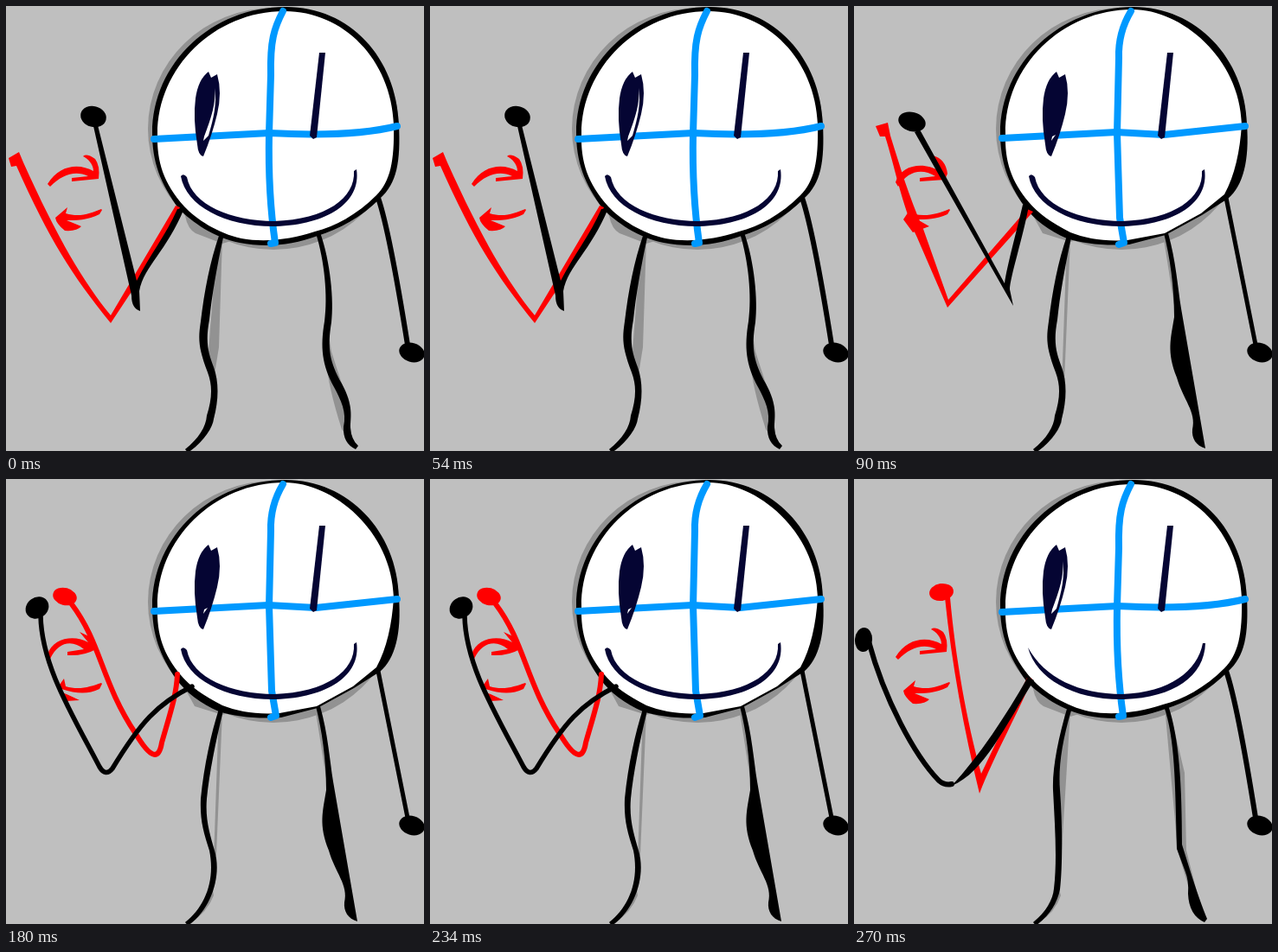
Recreate the animation shown at these times as an HTML page with a canvas. Size 483 px wide and 515 px high, loop 0.36 s.

```html
<!DOCTYPE html>
<html lang="en">
<head>
<meta charset="utf-8">
<title>Waving doodle</title>
<style>
html, body { margin: 0; width: 100%; height: 100%; overflow: hidden; background: #bfbfbf; }
canvas { display: block; }
</style>
</head>
<body>
<canvas id="stage" width="483" height="515"></canvas>
<script>
const ctx = document.getElementById('stage').getContext('2d');
const BLACK = '#000', RED = '#f00', BLUE = '#0099ff', NAVY = '#050533', GRAY = '#929292';
const STEP = 90;

function fill(color, d) {
  ctx.fillStyle = color;
  ctx.fill(new Path2D(d));
}

function line(color, width, d) {
  ctx.strokeStyle = color;
  ctx.lineWidth = width;
  ctx.stroke(new Path2D(d));
}

function oval(color, x, y, rx, ry, degrees = 0) {
  ctx.fillStyle = color;
  ctx.beginPath();
  ctx.ellipse(x, y, rx, ry, degrees * Math.PI / 180, 0, 2 * Math.PI);
  ctx.fill();
}

// Two ways the body line work is drawn: smooth curves and a simplified, angular version.
const smooth = {
  chin: 'M200 230L207 243Q210 258 219 263L250 275L300 260Z',
  rim: 'M323 1C398 1 451 60 454 137C456 180 452 205 432 223C410 245 385 258 360 266C330 277 300 280 270 274C240 268 215 250 200 235C178 205 169 180 169 147C169 66 238 1 323 1Z',
  skin: 'M322 6C390 6 445 62 448 137C449 180 444 203 428 219C405 242 380 255 357 261C330 270 300 274 272 269C245 263 220 247 206 232C182 205 174 180 175 148C175 72 240 6 322 6Z',
  across: 'M171 154L304 147Q400 152 452 139',
  down: 'M320 6C310 25 305 40 306 80L304 147C303 200 306 240 311 274L306 275',
  gap: 'M241 95C243 112 237 130 229 151L228 156L234 150C240 130 244 112 241 95Z',
  arm: 'M430 222Q443 260 464 392', armWidth: 6,
  arrows: 'M48 206C62 183 85 182 101 191C101 183 95 177 89 174Q93 170 103 177Q109 185 107 200L76 203L76 199L95 197C80 190 65 195 51 209Z' +
    'M111 236L108 241C95 248 80 248 70 248L87 255Q82 261 68 260Q58 252 57 245L71 233L69 240C85 245 98 240 110 235Z'
};

const angular = {
  chin: 'M200 230L218 263L250 273L300 260Z',
  rim: 'M323 1C395 1 452 60 454 137C457 178 450 208 432 223L402 242L360 265L318 276C290 278 265 275 246 269C225 260 208 247 197 232C178 205 169 180 169 147C169 66 238 1 323 1Z',
  skin: 'M322 4C378 4 446 60 448 137C446 168 440 196 428 218L401 240L359 263L316 271C290 273 268 269 250 262C228 251 212 239 202 227C182 203 174 180 175 148C174 70 240 4 322 4Z',
  across: 'M171 153L303 146L358 149L452 139',
  down: 'M320 6Q305 31 306 60L304 147L307 245L312 274L306 276',
  gap: 'M229 151L228 156L233 149Z',
  arm: 'M430 222L464 392', armWidth: 5,
  arrows: 'M48 204C54 183 82 180 98 191Q97 181 91 173Q106 177 108 194L105 201L76 203L76 199L94 197C78 187 62 191 51 209Z' +
    'M111 236L108 241C95 247 83 247 73 247L87 255L68 262L57 247L67 232L70 241C85 244 98 240 110 235Z'
};

const MOUTH = 'M202 197Q205 193 209 198C215 230 260 249 310 249C370 247 404 222 402 191L405 189C411 228 370 253 312 255C255 256 208 232 202 197Z';
const POINTED_MOUTH = 'M201 195C220 230 260 249 310 249C365 247 397 222 403 190L406 190C405 228 370 253 312 255C255 256 211 232 201 195Z';
const CURVY_LEG = 'M246 266L251 268C243 305 238 335 235 363C230 390 234 402 240 418C246 435 246 455 240 478C239 488 228 505 210 517L207 513C223 500 231 487 232 474C238 455 239 440 233 424C222 395 222 385 225 365C229 330 236 295 246 266Z';
const WEDGE_LEG = 'M358 263L363 263C372 295 374 325 378 350L406 512C395 509 390 500 391 490C396 470 380 455 373 430C361 400 366 385 370 360C370 325 365 290 358 263Z';
const THIN_SHADE = 'M246 268L250 269L243 435L240 440ZM357 264L362 266L375 350L370 346ZM238 470L240 482Q232 502 214 513Z';

const poses = [
  {
    body: smooth, mouth: MOUTH, leftLeg: CURVY_LEG,
    shade: 'M244 268L250 268L246 395L240 432L234 400ZM372 375L376 400L398 468L397 500L388 490Q372 440 370 410Z',
    rightLeg: 'M358 263L363 262C375 297 379 340 376 366C371 396 374 412 388 437C402 463 398 475 398 488Q399 502 407 509L404 513Q389 506 390 487C394 470 387 456 379 441C365 415 363 395 368 365C372 335 368 295 358 263Z',
    waving() {
      fill(RED, 'M3 176L15 169L20 181C60 270 90 320 121 358L196 231L201 233C185 270 160 305 152 320L121 367C75 310 50 270 12 185L6 186Z');
      fill(BLACK, 'M101 139L106 138L151 318C165 290 185 265 198 235L206 234C185 285 160 300 154 330L155 353Q145 350 145 335Z');
      oval(BLACK, 101, 128, 15, 12, 15);
    }
  },
  {
    body: angular, mouth: MOUTH, leftLeg: CURVY_LEG, rightLeg: WEDGE_LEG, shade: THIN_SHADE,
    waving() {
      fill(RED, 'M25 139L39 135L42 150C53 185 63 220 80 258L109 340L200 235L207 238L108 349L73 268C55 230 47 185 36 151L30 151Z');
      fill(BLACK, 'M70 146L76 143L174 321C177 300 188 260 195 230L202 231C196 265 180 315 180 328L184 347L176 333Z');
      oval(BLACK, 67, 134, 16, 11, 15);
    }
  },
  {
    body: angular, mouth: MOUTH, rightLeg: WEDGE_LEG, shade: THIN_SHADE,
    leftLeg: 'M246 266L251 268C242 305 235 340 232 370C230 395 236 412 241 430C250 460 236 500 210 517L207 513C230 495 242 465 235 430C228 408 224 395 225 370C229 330 237 295 246 266Z',
    arrows: 'M48 203C54 183 80 180 95 189L85 177L100 184L104 197Q90 205 71 204L71 200L90 197C76 185 60 189 51 208Z' +
      'M111 237L108 243C95 249 83 249 64 243L59 242L67 231L69 240C85 245 98 240 110 236ZM62 246L70 249L85 256L70 257Z',
    waving() {
      line(RED, 6, 'M76 145C110 190 110 235 150 295Q175 337 180 305C190 270 197 250 198 226');
      oval(RED, 68, 136, 14, 10, 15);
      line(BLACK, 5.5, 'M40 158C41 215 75 270 108 333Q115 345 123 335C155 282 175 260 215 240');
      oval(BLACK, 36, 149, 14, 12, -35);
    }
  },
  {
    body: smooth, mouth: POINTED_MOUTH,
    shade: 'M244 268L250 268L240 430L234 360ZM359 263L364 265L382 340L384 430L403 505L386 470L374 430ZM236 470L239 482Q232 502 214 513Z',
    leftLeg: 'M246 266L251 268C240 305 236 335 238 360C241 400 241 450 238 475Q233 500 210 517L207 513Q229 495 231 474C235 440 232 400 230 360C229 335 236 300 246 266Z',
    rightLeg: 'M358 263L363 262C376 300 379 355 379 423L388 452Q400 490 408 509L405 513Q387 505 386 480Q387 465 383 455L373 428C371 350 371 300 358 263Z',
    waving() {
      fill(RED, 'M105 137L111 137C117 205 130 280 147 341L200 230L206 231C190 270 162 320 145 364C127 290 113 215 105 137Z');
      oval(RED, 101, 131, 14, 10, -8);
      line(BLACK, 6, 'M17 188C35 255 70 320 98 349Q105 355 113 353');
      fill(BLACK, 'M113 355C145 320 175 275 201 229L208 233C175 285 150 340 113 355Z');
      oval(BLACK, 11, 186, 10, 14, 5);
    }
  }
];

function drawFace({ body, mouth }) {
  line(BLUE, 8, body.across);
  line(BLUE, 8, body.down);
  fill(NAVY, 'M219 107Q222 85 234 76L237 83L244 79Q250 100 244 125Q238 150 228 174Q222 173 221 160Q216 130 219 107Z');
  fill('#fff', body.gap);
  fill(NAVY, 'M362 54L369 54L359 152L355 154L351 150Z');
  fill(NAVY, mouth);
}

function drawPose(pose) {
  const { body } = pose;
  fill('#bfbfbf', 'M0 0H483V515H0Z');
  oval(GRAY, 309, 142, 145, 140);
  fill(GRAY, body.chin);
  fill(GRAY, pose.shade);
  fill(BLACK, pose.leftLeg);
  fill(BLACK, pose.rightLeg);
  line(BLACK, body.armWidth, body.arm);
  oval(BLACK, 469, 401, 15, 11, 17);
  fill(BLACK, body.rim);
  fill('#fff', body.skin);
  drawFace(pose);
  fill(RED, pose.arrows || body.arrows);
  pose.waving();
}

ctx.lineCap = 'round';
ctx.lineJoin = 'round';
const start = performance.now();

function tick() {
  const elapsed = performance.now() - start;
  drawPose(poses[Math.floor(elapsed / STEP) % poses.length]);
  requestAnimationFrame(tick);
}
tick();
</script>
</body>
</html>
```
